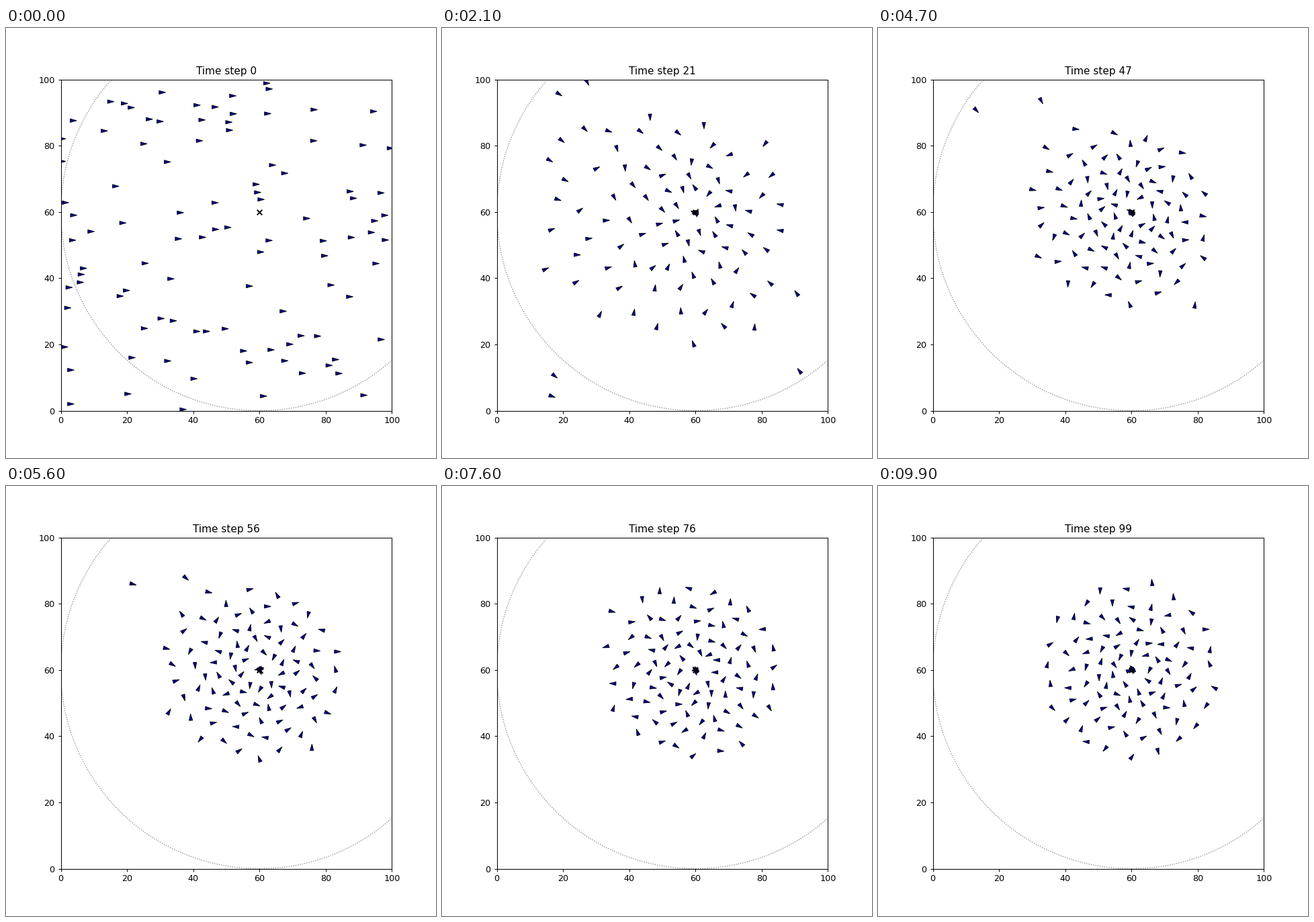
Recreate the animation shown at these times as a matplotlib script. Size 640 by 640 pixels, loop 10000 ms.

```python
import numpy as np
import matplotlib.pyplot as plt
from matplotlib.animation import FuncAnimation
from matplotlib.collections import PolyCollection

STEPS = 100
AGENTS = 100
SIZE = 100
GOAL = np.array([60.0, 60.0])
RANGE = 60        # agents farther than this cannot sense the goal
PULL = 1.1
PUSH = 2.3
PUSH_RANGE = 20
NOISE = 0.3
MAX_STEP = 1.2


def length(v):
    return np.linalg.norm(v, axis=-1, keepdims=True)


def simulate():
    """Return positions and headings for every time step."""
    rng = np.random.default_rng(7)
    pos = rng.uniform(0, SIZE, (AGENTS, 2))
    head = np.zeros(AGENTS)
    leaders = np.argsort(length(pos - GOAL)[:, 0])[:5]
    track = [(pos, head)]
    for _ in range(STEPS - 1):
        to_goal = GOAL - pos
        dist = length(to_goal)

        # Steady pull to the goal, fading push between neighbours.
        gap = pos[:, None] - pos
        space = length(gap)
        fade = np.clip(1 - space / PUSH_RANGE, 0, 1)
        push = PUSH * (gap / (space ** 2 + 1) * fade).sum(axis=1)
        push[leaders] = 0
        move = PULL * to_goal / np.maximum(dist, 2) + push
        move += rng.normal(0, NOISE, move.shape)
        move /= np.maximum(length(move) / MAX_STEP, 1)

        # Agents out of range wander at unit speed.
        wander = head + rng.normal(0, 0.6, AGENTS)
        stroll = np.column_stack([np.cos(wander), np.sin(wander)])
        move = np.where(dist < RANGE, move, stroll)

        head = np.arctan2(move[:, 1], move[:, 0])
        pos = (pos + move) % SIZE
        track.append((pos, head))
    return track


def arrowheads(pos, head):
    shape = np.array([(-1, -0.55), (1, 0), (-1, 0.55)])
    c, s = np.cos(head), np.sin(head)
    x, y = shape.T
    return np.stack([pos[:, :1] + np.outer(c, x) - np.outer(s, y),
                     pos[:, 1:] + np.outer(s, x) + np.outer(c, y)], axis=-1)


track = simulate()

fig, ax = plt.subplots(figsize=(7, 7), dpi=640 / 7)
ax.set_aspect("equal")
ax.set_xlim(0, SIZE)
ax.set_ylim(0, SIZE)
ax.add_patch(plt.Circle(GOAL, RANGE, fill=False, ls=":", ec="gray"))
ax.scatter(*GOAL, marker="x", c="k", zorder=3)
agents = PolyCollection(arrowheads(*track[0]), facecolor="darkblue",
                        edgecolor="k", linewidth=0.6, joinstyle="miter",
                        zorder=2)
ax.add_collection(agents, autolim=False)
title = ax.set_title("Time step 0")


def draw(step):
    agents.set_verts(arrowheads(*track[step]))
    title.set_text(f"Time step {step}")
    return agents, title


anim = FuncAnimation(fig, draw, frames=STEPS, interval=100, repeat=True,
                     repeat_delay=0, blit=False)
plt.show()
```
